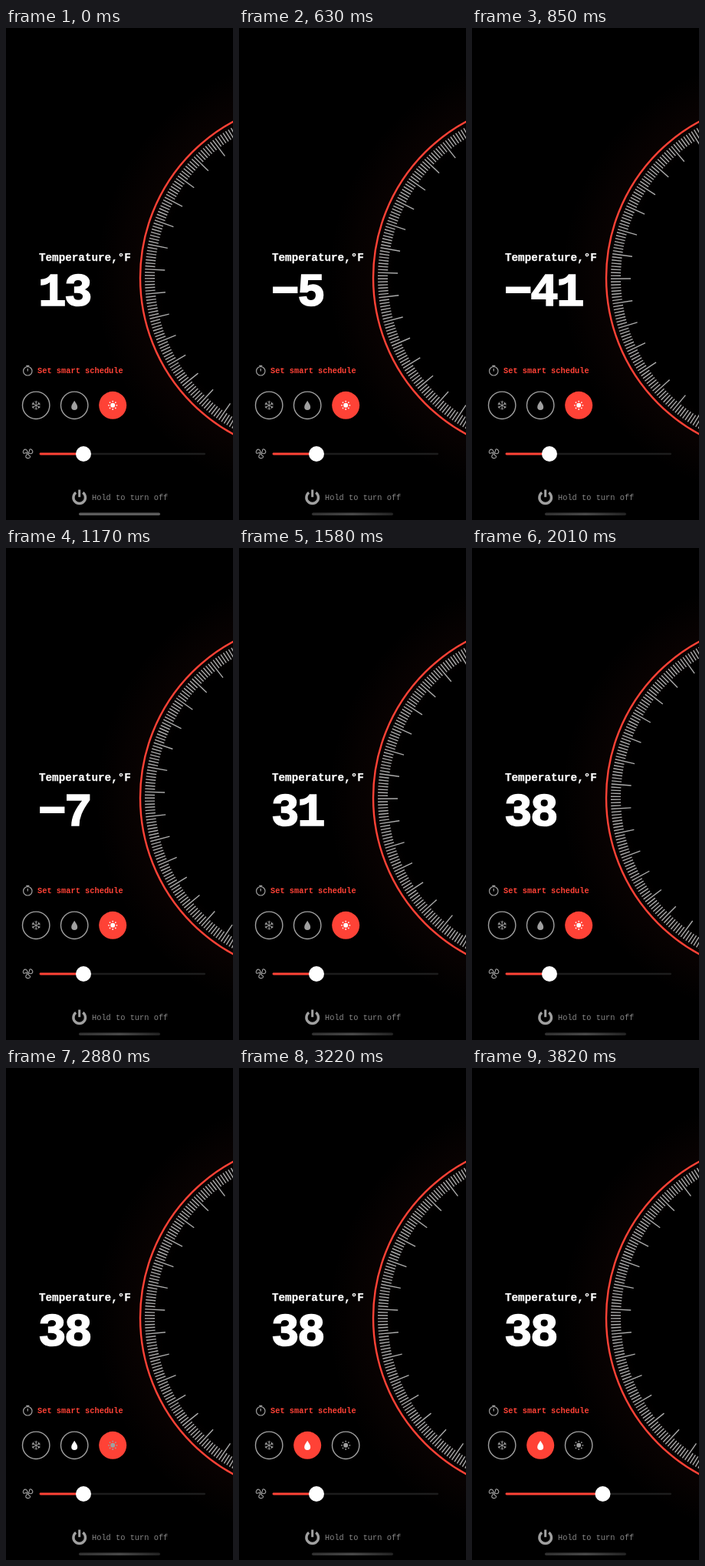
Animation of 296x640 px, one loop 3870 ms. Source, as an HTML page:

```html
<!DOCTYPE html>
<html lang="en">
<head>
<meta charset="utf-8">
<title>Thermostat</title>
<style>
html, body { margin: 0; width: 100%; height: 100%; overflow: hidden; background: #000; }
svg { display: block; width: 296px; height: 640px; }
text { font-family: "Liberation Mono", "DejaVu Sans Mono", monospace; white-space: pre; }
.strong { font-weight: bold; stroke-width: .25px; }
#value { font-size: 61px; letter-spacing: -2.6px; stroke-width: 1.7px; }
.line { fill: none; stroke: #a0a0a0; }
</style>
</head>
<body>
<svg viewBox="0 0 296 640">
  <defs>
    <radialGradient id="glow" gradientUnits="userSpaceOnUse" cx="406" cy="325" r="290">
      <stop offset=".7" stop-color="#ff4236" stop-opacity="0"/>
      <stop offset=".8" stop-color="#ff4236" stop-opacity=".035"/>
      <stop offset="1" stop-color="#ff4236" stop-opacity="0"/>
    </radialGradient>
    <linearGradient id="fade">
      <stop offset="0" stop-color="#303030"/>
      <stop offset=".5" stop-color="#484848"/>
      <stop offset="1" stop-color="#222"/>
    </linearGradient>
  </defs>

  <circle cx="406" cy="325" r="290" fill="url(#glow)"/>
  <circle cx="406" cy="325" r="231" fill="none" stroke="#ff4236" stroke-width="2.4"/>
  <path id="dial" fill="none" stroke="#aaa" stroke-width="1.4"/>

  <g class="strong" fill="#fff" stroke="#fff">
    <text x="43" y="303" font-size="14.28">Temperature,°F</text>
    <text id="value" x="42" y="361"></text>
  </g>

  <g class="line" stroke-width="1.2">
    <circle cx="28.3" cy="446.3" r="5.7"/>
    <path d="M26.3 439.3h4M28.3 443v3.6"/>
  </g>
  <text class="strong" x="41" y="449" font-size="10.35" fill="#ff4236">Set smart schedule</text>

  <g class="line" stroke-width="1.4">
    <circle cx="39.2" cy="490.8" r="17.7"/>
    <circle id="dropRing" cx="89.2" cy="490.8" r="17.7"/>
    <circle id="sunRing" cx="139.2" cy="490.8" r="17.7"/>
  </g>
  <circle id="dropFill" cx="89.2" cy="490.8" r="18" fill="#ff4236"/>
  <circle id="sunFill" cx="139.2" cy="490.8" r="18" fill="#ff4236"/>
  <g id="snow" class="line" stroke-width=".9" transform="translate(39.2 490.8)"></g>
  <path id="drop" d="M89.2 484.8C90.6 487.6 93.2 490 93.2 493a4 4 0 0 1-8 0C85.2 490 87.8 487.6 89.2 484.8Z"/>
  <g id="sun" transform="translate(139.2 490.8)"><circle r="3"/></g>

  <g id="fan" class="line" stroke-width="1.1" transform="translate(28.6 553)"></g>
  <path d="M45 554H258.7" stroke="#1d1d1d" stroke-width="2.6" stroke-linecap="round"/>
  <path id="level" stroke="#ff4236" stroke-width="2.8" stroke-linecap="round"/>
  <circle id="thumb" cy="554" r="10" fill="#fff"/>

  <g class="line" stroke-width="3.4">
    <path d="M91.2 604.4a7.8 7.8 0 1 0 9 0"/>
    <path d="M95.7 600.6v9.6" stroke-width="3"/>
  </g>
  <text x="112" y="614" font-size="10.35" fill="#858585">Hold to turn off</text>
  <rect id="home" x="95" y="630.6" width="106" height="3.4" rx="1.7"/>
</svg>

<script>
const LOOP = 3870, STEP = 106, PHASE = 12;
const MAJOR = 8.3, PER_MAJOR = 8; // degrees between long ticks, ticks in that span
// Turning points of the dial: time, temperature, rotation.
const TURNS = [[520, 13, 2.9], [836, -41, 24.6], [1154, -7, 10.3], [1578, 31, -8.6], [2002, 38, -12]];
const RELEASE = 2880, SETTLE = -1.7;

const $ = id => document.getElementById(id);
const set = (id, name, value) => $(id).setAttribute(name, value);
const ramp = (t, from, to) => Math.min(1, Math.max(0, (t - from) / (to - from)));
const smooth = p => p * p * (3 - 2 * p);

function tickMarks() {
  let d = "";
  for (let i = -90; i <= 90; i++) {
    const a = i * MAJOR / PER_MAJOR * Math.PI / 180;
    const at = r => `${-r * Math.cos(a)} ${-r * Math.sin(a)}`;
    d += `M${at(225)}L${at(i % PER_MAJOR ? 212 : 199)}`;
  }
  return d;
}

const spokes = (n, shape) => Array.from({ length: n }, (_, i) =>
  `<g transform="rotate(${i * 360 / n})">${shape}</g>`).join("");

set("dial", "d", tickMarks());
$("snow").innerHTML = spokes(6, '<path d="M0 0V-6M-1.8 -5.2L0 -3.4L1.8 -5.2"/>');
$("sun").innerHTML += spokes(8, '<circle cy="-5.2" r=".9"/>');
$("fan").innerHTML = '<circle r="1.2"/>' +
  spokes(3, '<path d="M-.6 1.4C-3.6 2.4-3.6 6.2-.4 6.6C2.6 7 4 4.4 2.2 3.6C1 3.2 .8 2.4 .7 1.4"/>');

// Adds up the change of one column over all turns.
function follow(column, t) {
  return TURNS.slice(1).reduce((sum, turn, i) =>
    sum + (turn[column] - TURNS[i][column]) * ramp(t, TURNS[i][0], turn[0]), TURNS[0][column]);
}

function draw(now) {
  const time = now % LOOP;
  const t = Math.floor((time + PHASE) / STEP) * STEP - PHASE; // motion advances in steps
  const released = time >= RELEASE;
  const degrees = Math.round(follow(1, t));
  const angle = follow(2, t) + (released ? SETTLE : 0);
  const mix = ramp(t, RELEASE, 3168);
  const x = 101 + 69.5 * smooth(ramp(t, 3300, 3804));

  $("value").textContent = String(degrees).replace("-", "\u2212");
  set("dial", "transform", `translate(406 325) rotate(${angle})`);
  set("dropFill", "opacity", mix);
  set("dropRing", "opacity", 1 - mix);
  set("sunFill", "opacity", 1 - mix);
  set("sunRing", "opacity", mix);
  set("drop", "fill", released ? "#fff" : "#a0a0a0");
  set("sun", "fill", released ? "#a0a0a0" : "#fff");
  set("thumb", "cx", x);
  set("level", "d", `M45 554H${x}`);
  set("home", "fill", t < 600 ? "#5c5c5c" : "url(#fade)");
}

const start = performance.now();
function loop() {
  draw(performance.now() - start);
  requestAnimationFrame(loop);
}
loop();
</script>
</body>
</html>
```
